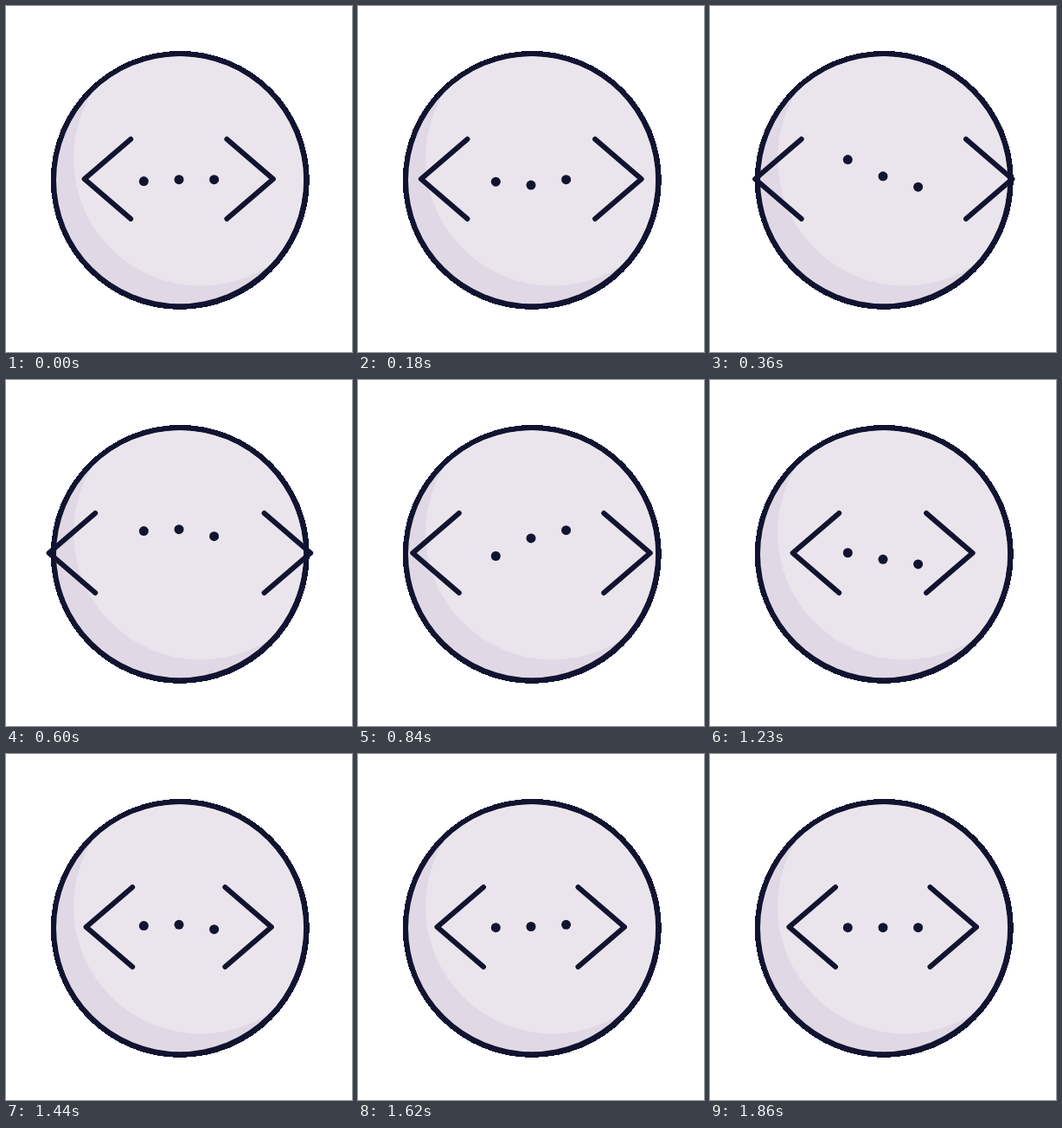
These frames come from a looping animation (400 px wide and 400 px high, 3890 ms). An HTML page:

```html
<!DOCTYPE html>
<html lang="en">
<head>
<meta charset="utf-8">
<title>Code badge</title>
<style>
  html, body { margin: 0; width: 100%; height: 100%; overflow: hidden; background: #fff; }
  svg { display: block; width: 100%; height: 100%; }
  .ink { fill: #111331; }
  .arm { fill: none; stroke: #111331; stroke-width: 6; stroke-linecap: round; stroke-linejoin: round; }
</style>
</head>
<body>
<svg viewBox="0 0 400 400">
  <clipPath id="disc"><circle cx="201" cy="201.2" r="143"/></clipPath>
  <circle class="ink" cx="201.3" cy="201.4" r="149.5" shape-rendering="crispEdges"/>
  <circle cx="201" cy="201.2" r="143" fill="#e0d9e5"/>
  <circle cx="225" cy="176.5" r="146.8" fill="#eae5ec" clip-path="url(#disc)"/>
  <path id="left" class="arm" d="M145 154L91.5 200L145 246"/>
  <path id="right" class="arm" d="M254.5 154L308 200L254.5 246"/>
  <circle class="ink dot" cx="159.3" cy="200.7" r="5.5"/>
  <circle class="ink dot" cx="200" cy="200.7" r="5.5"/>
  <circle class="ink dot" cx="240.6" cy="200.7" r="5.5"/>
</svg>
<script>
const LOOP = 3890, STEP = 30, REST = 1860, DELAY = 133;
const LATE = 1.8; // warp that makes a move start slowly and stop fast

// Poses: time in ms, offset, and the warp of the move that leads there.
const spread = [
  { t: -40, v: 0 },
  { t: 440, v: 1 },
  { t: 1140, v: -0.11, warp: LATE },
  { t: 1580, v: 0 }
];
const bounce = [
  { t: -40, v: 0 },
  { t: 90, v: 8.5 },
  { t: 440, v: -28 },
  { t: 935, v: 12.5, warp: LATE },
  { t: 1330, v: -3.5 },
  { t: 1590, v: 0 }
];

const smooth = u => u * u * (3 - 2 * u);

// Each move adds its eased share of the way to the next pose.
function pose(keys, t) {
  let v = keys[0].v;
  for (let i = 1; i < keys.length; i++) {
    const a = keys[i - 1], b = keys[i];
    const u = Math.min(1, Math.max(0, (t - a.t) / (b.t - a.t)));
    v += (b.v - a.v) * smooth(u ** (b.warp || 1));
  }
  return v;
}

const left = document.getElementById('left');
const right = document.getElementById('right');
const dots = document.querySelectorAll('.dot');
const move = (el, x, y) => el.setAttribute('transform', `translate(${x.toFixed(2)} ${y.toFixed(2)})`);

function draw(t) {
  const open = pose(spread, t);
  move(left, -42.5 * open, 0);
  move(right, 44.8 * open, 0);
  dots.forEach((dot, i) => move(dot, 0, pose(bounce, t - i * DELAY)));
}

const start = performance.now();
function tick() {
  const t = (performance.now() - start) % LOOP;
  draw(Math.min(Math.floor(t / STEP) * STEP, REST));
  requestAnimationFrame(tick);
}
tick();
</script>
</body>
</html>
```
